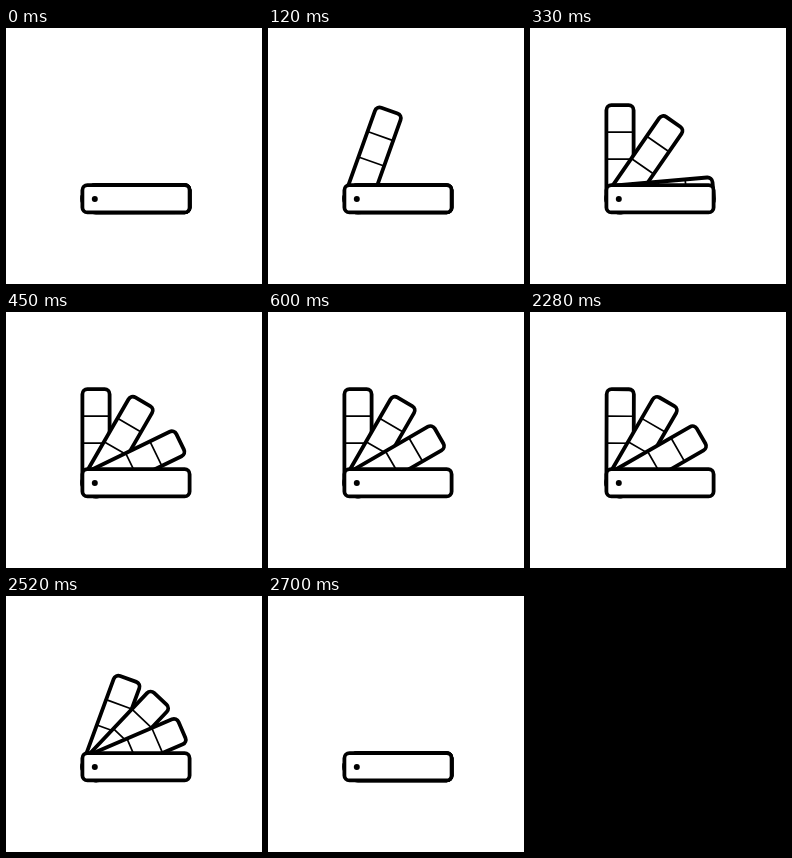
Recreate the animation shown at these times as an HTML page. Size 256 by 256 pixels, loop 3000 ms.

```html
<!DOCTYPE html>
<html lang="en">
<head>
<meta charset="utf-8">
<title>Swatch fan</title>
<style>
  html, body { margin: 0; width: 100%; height: 100%; overflow: hidden; background: #fff; }
  svg { display: block; width: 100%; height: 100%; }
  .card { fill: #fff; stroke: #000; stroke-width: 3.8; }
  .rule { stroke: #000; stroke-width: 1.7; }
</style>
</head>
<body>
<svg viewBox="0 0 256 256">
  <defs>
    <g id="swatch">
      <path class="card" d="M0-13.6H88.6a5 5 0 0 1 5 5V8.6a5 5 0 0 1-5 5H0a13.6 13.6 0 0 1 0-27.2z"/>
      <path class="rule" d="M39.6-13.6v27.2M66.6-13.6v27.2"/>
    </g>
  </defs>
  <g transform="translate(90 170.8)">
    <use class="blade" href="#swatch"/>
    <use class="blade" href="#swatch"/>
    <use class="blade" href="#swatch"/>
    <rect class="card" x="-13.6" y="-13.6" width="107.2" height="27.2" rx="5"/>
    <circle cx="-1.2" cy=".3" r="3"/>
  </g>
</svg>
<script>
const LOOP = 3000, OPEN = 300, STAGGER = 150, CLOSE_AT = 2250, CLOSE = 450;
const ANGLES = [90, 60, 30];
const blades = document.querySelectorAll('.blade');

const clamp = v => Math.min(1, Math.max(0, v));
const bezier = (a, b, s) => 3 * a * s * (1 - s) ** 2 + 3 * b * s * s * (1 - s) + s ** 3;

// Fast start, long soft landing: cubic-bezier(.2, .1, .1, 1)
function ease(x) {
  if (x <= 0 || x >= 1) return clamp(x);
  let lo = 0, hi = 1;
  for (let i = 0; i < 24; i++) {
    const mid = (lo + hi) / 2;
    if (bezier(.2, .1, mid) < x) lo = mid; else hi = mid;
  }
  return bezier(.1, 1, lo);
}

// Blades open one after another and close together with the mirrored curve.
function spread(t, i) {
  return t < CLOSE_AT
    ? ease((t - i * STAGGER) / OPEN)
    : ease(1 - (t - CLOSE_AT) / CLOSE);
}

function draw() {
  const t = performance.now() % LOOP;
  blades.forEach((blade, i) =>
    blade.setAttribute('transform', `rotate(${-ANGLES[i] * spread(t, i)})`));
  requestAnimationFrame(draw);
}
draw();
</script>
</body>
</html>
```
